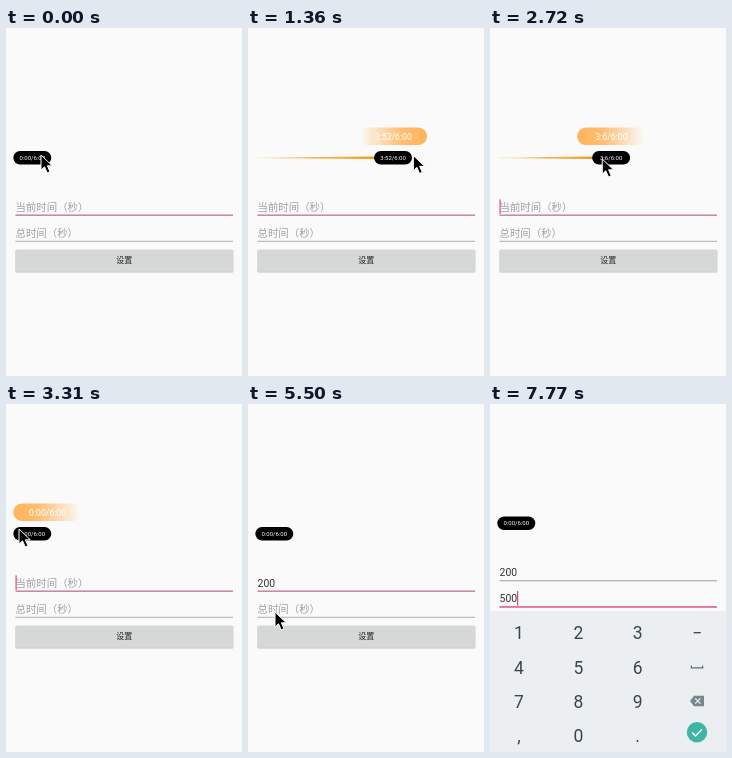
An HTML page that plays this animation: 236 by 348 pixels, repeating every 8000 ms.

```html
<!DOCTYPE html>
<html lang="zh">
<head>
<meta charset="utf-8">
<style>
  html, body { margin: 0; width: 100%; height: 100%; overflow: hidden; background: #fafafa; }
  svg { display: block; width: 236px; height: 348px; font-family: Roboto, "Noto Sans CJK SC", "Noto Sans CJK", sans-serif; }
  .mid { text-anchor: middle; }
  .hint { fill: #a0a0a0; font-size: 10.4px; }
  .value { fill: #333; font-size: 10.4px; }
</style>
</head>
<body>
<svg viewBox="0 0 236 348">
  <defs>
    <linearGradient id="fadeRight">
      <stop offset="0" stop-color="#ffb45c"/>
      <stop offset=".35" stop-color="#ffb45c" stop-opacity=".88"/>
      <stop offset="1" stop-color="#ffb45c" stop-opacity="0"/>
    </linearGradient>
    <linearGradient id="fadeLeft" href="#fadeRight" x1="1" x2="0"/>
    <linearGradient id="trail">
      <stop offset="0" stop-color="#f5a32a" stop-opacity=".15"/>
      <stop offset=".5" stop-color="#f5a32a" stop-opacity=".8"/>
      <stop offset="1" stop-color="#f09a1a"/>
    </linearGradient>
  </defs>
  <rect width="236" height="348" fill="#fafafa"/>
  <g id="page">
    <path id="track" fill="url(#trail)"/>
    <g id="bubble">
      <rect id="pill" y="99.5" width="68" height="17.6" rx="8.8"/>
      <text id="bubbleText" class="mid" y="111.6" font-size="8.7" fill="#fff"></text>
    </g>
    <g id="knob">
      <rect y="123" width="38" height="13.4" rx="6.7"/>
      <text id="knobText" class="mid" x="19" y="131.9" font-size="6" fill="#fff"></text>
    </g>
    <text id="hint1" class="hint" x="9.6" y="182.8">当前时间（秒）</text>
    <text id="value1" class="value" x="9.6" y="182.8"></text>
    <rect id="line1" x="9.5" y="186.6" width="217.5" height="1.1"/>
    <text id="hint2" class="hint" x="9.6" y="208.8">总时间（秒）</text>
    <text id="value2" class="value" x="9.6" y="208.8"></text>
    <rect id="line2" x="9.5" width="217.5"/>
    <rect id="caret" width="1.2" height="14.5" fill="#e0457f"/>
    <rect x="9.5" y="222" width="217.8" height="22.6" rx="1.2" fill="#c4c5c5"/>
    <rect x="9.5" y="221.4" width="217.8" height="22.4" rx="1.2" fill="#d6d7d7"/>
    <text class="mid" x="118.3" y="235.2" font-size="8" fill="#222">设置</text>
  </g>
  <g id="keyboard">
    <rect y="207" width="236" height="141" fill="#eceff1"/>
    <g id="keys" class="mid" font-size="17.5" fill="#37474f"></g>
    <path d="M201.3 261.5v2.3h11.4v-2.3" fill="none" stroke="#607078" stroke-width="1.2"/>
    <path d="M200 297l4-5.2h10v10.4h-10z" fill="#78868d"/>
    <path d="M205.2 294.4l5.2 5.2m0-5.2l-5.2 5.2" stroke="#eceff1" stroke-width="1.3"/>
    <circle cx="207" cy="328.3" r="10.2" fill="#3fb5a6"/>
    <path d="M202.2 328.6l3.4 3.3 6.3-6.6" fill="none" stroke="#fff" stroke-width="1.4"/>
  </g>
  <path id="cursor" d="M0 0V15.2L3.5 11.8 6.2 17.9 9 16.7 6.3 10.8H11.3Z" fill="#000" stroke="#fff" stroke-width="1" stroke-linejoin="round"/>
</svg>
<script>
const LOOP = 8000;
const PINK = "#e0508a", MAUVE = "#b9597a", GRAY = "#a6a6a6";
const $ = id => document.getElementById(id);
const set = (id, attrs) => {
  for (const name in attrs) $(id).setAttribute(name, attrs[name]);
};
const show = (id, visible) => set(id, { visibility: visible ? "visible" : "hidden" });
const clamp = (v, lo, hi) => Math.min(hi, Math.max(lo, v));
const ramp = (t, from, to) => clamp((t - from) / (to - from), 0, 1);
const within = (t, spans) => spans.some(([from, to]) => t >= from && t < to);

// Monotone cubic through [time, ...values] keys.
function follow(keys, t, col = 1) {
  const last = keys.length - 1;
  if (t <= keys[0][0]) return keys[0][col];
  if (t >= keys[last][0]) return keys[last][col];
  const i = keys.findIndex(k => k[0] > t) - 1;
  const slope = j => j < 0 || j >= last ? 0
    : (keys[j + 1][col] - keys[j][col]) / (keys[j + 1][0] - keys[j][0]);
  const tangent = j => {
    const a = slope(j - 1), b = slope(j);
    return a * b > 0 ? 2 * a * b / (a + b) : 0;
  };
  const [a, b] = [keys[i], keys[i + 1]], h = b[0] - a[0], u = (t - a[0]) / h;
  return a[col] + (b[col] - a[col]) * u * u * (3 - 2 * u)
    + h * u * (1 - u) * (tangent(i) * (1 - u) - tangent(i + 1) * u);
}

const progressKeys = [
  [790, 0], [970, .1028], [1590, .9], [1870, 1],
  [2200, 1], [2720, .5167], [3000, .1], [3180, 0]
];
const dragPath = [
  [0, 35, 127], [290, 28, 128], [790, 28, 128], [970, 59, 126], [1590, 206, 129],
  [1880, 217, 131], [2200, 217, 131], [2720, 112.5, 131], [3000, 31, 128], [3310, 13, 125]
];
const focusPath = [[5100, 15, 147], [5330, 30, 235], [5500, 27, 208], [5820, 27, 207]];
const exitPath = [[7090, 30, 207], [7300, 222, 262]];
const pointerSpans = [[0, 3780, dragPath], [5100, 5960, focusPath], [7090, 7300, exitPath]];

const caretSpans = [
  [490, 960], [1430, 1890], [2370, 2840], [3300, 3780], [4270, 5100], [5590, 6250],
  [6400, 7290], [7770, LOOP]
];
const typed = (t, word, times) => word.slice(0, times.filter(at => t >= at).length);

["123−", "456", "789", ",0."].forEach((row, r) => [...row].forEach((key, c) => {
  const label = document.createElementNS("http://www.w3.org/2000/svg", "text");
  label.setAttribute("x", 29 + c * 59.3);
  label.setAttribute("y", 235.4 + r * 34.3);
  label.textContent = key;
  $("keys").append(label);
}));

function drawSlider(t) {
  const p = follow(progressKeys, t);
  const left = 7.3 + 184 * p, seconds = Math.round(360 * p);
  const label = `${Math.floor(seconds / 60)}:${seconds % 60 || "00"}/6:00`;
  const pillLeft = clamp(left + 19 - 34, 7.3, 161);
  const forward = t >= 790 && t < 2200;
  set("knob", { transform: `translate(${left} 0)` });
  set("pill", { x: pillLeft, fill: `url(#${forward ? "fadeLeft" : "fadeRight"})` });
  set("bubbleText", { x: pillLeft + 34.3 });
  set("bubble", { opacity: ramp(t, 440, 550) * (1 - ramp(t, 3490, 3570)) });
  set("track", { d: `M9 129.5L${left + 2} 128.6V131L9 130.2Z` });
  show("track", p > .005);
  $("bubbleText").textContent = $("knobText").textContent = label;
}

function drawFields(t) {
  const second = t >= 5780;
  const values = [typed(t, "200", [4330, 4480, 4590]), typed(t, "500", [6500, 6670, 6790])];
  values.forEach((value, i) => {
    $("value" + (i + 1)).textContent = value;
    show("hint" + (i + 1), !value);
  });
  set("line1", { fill: second ? GRAY : MAUVE });
  set("line2", { fill: second ? PINK : GRAY, y: second ? 212.6 : 212.8, height: second ? 1.5 : .9 });
  set("caret", {
    x: 9.5 + 5.84 * values[+second].length,
    y: second ? 197.4 : 171.4
  });
  show("caret", within(t, caretSpans));
}

function render(t) {
  drawSlider(t);
  drawFields(t);
  const rise = 1 - (1 - ramp(t, 5920, 6260)) ** 2;
  set("page", { transform: `translate(0 ${-10.4 * rise})` });
  set("keyboard", { transform: `translate(0 ${142 * (1 - rise)})` });
  const pointer = pointerSpans.find(([from, to]) => t >= from && t < to);
  show("cursor", pointer);
  if (pointer) {
    const path = pointer[2];
    set("cursor", { transform: `translate(${follow(path, t)} ${follow(path, t, 2)})` });
  }
}

const start = performance.now();
function tick() {
  render((performance.now() - start) % LOOP);
  requestAnimationFrame(tick);
}
tick();
</script>
</body>
</html>
```
